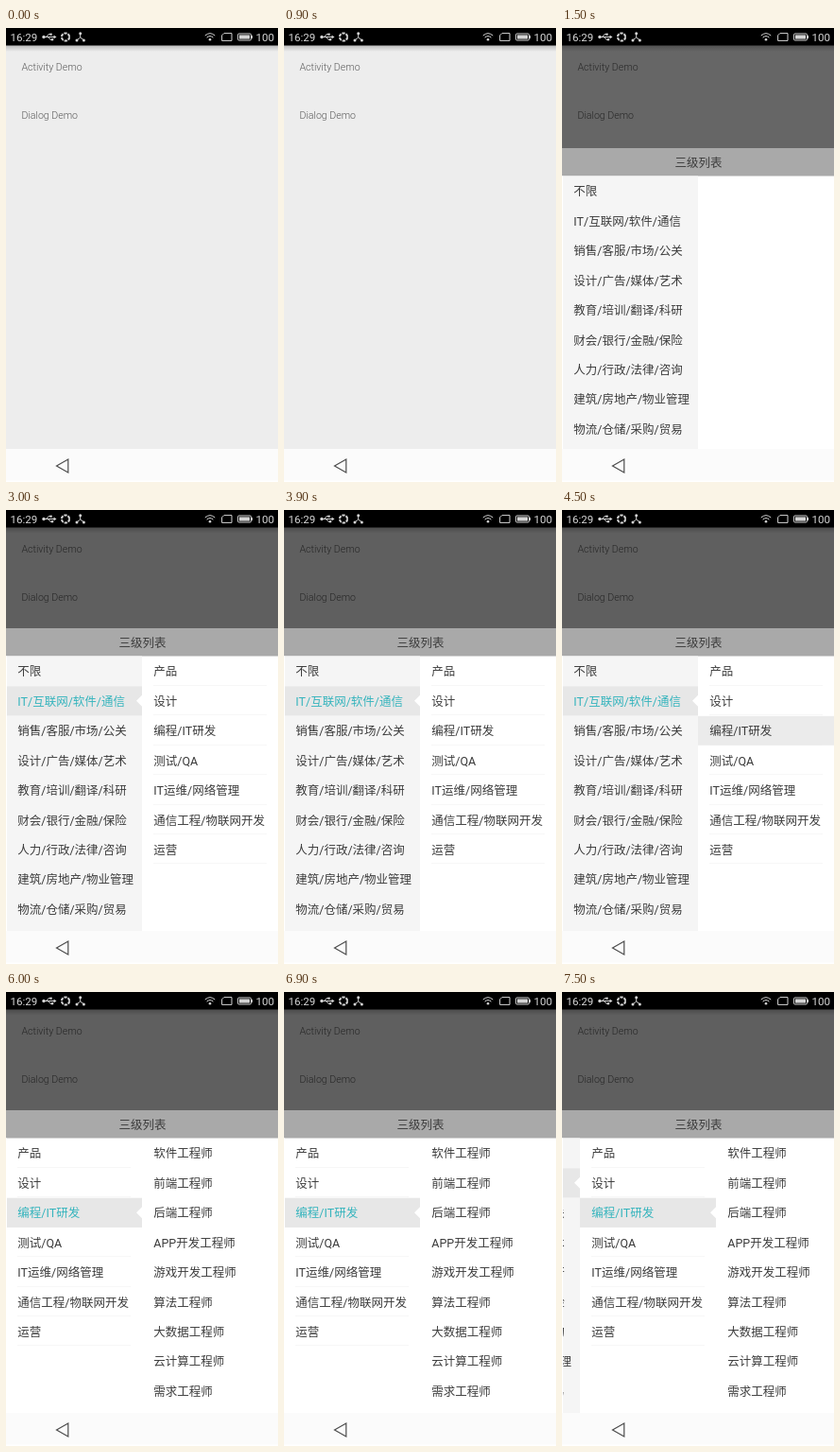
Write an HTML page that moves like this. It is 288 by 480 pixels and loops after 8000 ms.

```html
<!DOCTYPE html>
<html lang="zh-CN">
<head>
<meta charset="utf-8">
<title>三级列表</title>
<style>
  html, body { margin: 0; width: 100%; height: 100%; overflow: hidden; background: #fff; }
  svg { display: block; width: 288px; height: 480px; }
  text { font-family: Roboto, "Noto Sans CJK SC", "Noto Sans CJK", sans-serif; font-size: 12.5px; fill: #3c3c3c; }
  .label { font-size: 10.6px; font-weight: 300; fill: #5c5c5c; }
  .status { font-size: 11.6px; fill: #d8d8d8; }
  .icon { fill: none; stroke: #d4d4d4; }
  .solid { fill: #d4d4d4; }
  .divider { stroke: #f7f7f7; }

  .dim, .sheet, .strip, .shown2, .pressed, .shown3, .picked1, .picked2, .tint1, .tint2 {
    animation: 8s step-end infinite;
  }
  .dim { animation-name: dim; }
  .sheet { animation-name: sheet; }
  .strip { animation-name: strip; }
  .shown2, .picked1 { animation-name: second; }
  .pressed { animation-name: pressed; }
  .shown3, .picked2 { animation-name: third; }
  .tint1 { animation-name: tint1; }
  .tint2 { animation-name: tint2; }

  @keyframes dim { 0% { opacity: 0 } 18.75% { opacity: .57 } 37.5%, 100% { opacity: .595 } }
  @keyframes sheet {
    0% { opacity: 0; transform: translateY(2px) }
    18.75% { opacity: 1; transform: translateY(2px) }
    37.5%, 100% { opacity: 1; transform: none }
  }
  @keyframes strip {
    0% { transform: none }
    75% { transform: translateX(-144px) }
    93.75%, 100% { transform: translateX(-125px) }
  }
  @keyframes second { 0% { opacity: 0 } 37.5%, 100% { opacity: 1 } }
  @keyframes pressed { 0% { opacity: 0 } 56.25%, 100% { opacity: 1 } }
  @keyframes third { 0% { opacity: 0 } 75%, 100% { opacity: 1 } }
  @keyframes tint1 { 0% { fill: #3c3c3c } 37.5%, 100% { fill: #35b4bd } }
  @keyframes tint2 { 0% { fill: #3c3c3c } 75%, 100% { fill: #35b4bd } }
</style>
</head>
<body>
<svg viewBox="0 0 288 480">
  <defs>
    <linearGradient id="shade" x2="0" y2="1">
      <stop stop-opacity=".22"/>
      <stop offset="1" stop-opacity="0"/>
    </linearGradient>
  </defs>
  <rect width="288" height="480" fill="#fff"/>
  <rect y="18" width="288" height="428" fill="#ededed"/>
  <rect y="18" width="288" height="7" fill="url(#shade)"/>
  <text class="label" x="16.5" y="45">Activity Demo</text>
  <text class="label" x="16.5" y="96">Dialog Demo</text>
  <rect class="dim" y="18" width="288" height="428"/>

  <g class="sheet">
    <rect y="125" width="288" height="30" fill="#a9a9a9"/>
    <text x="144.5" y="144.6" text-anchor="middle">三级列表</text>
    <rect y="154.5" width="288" height="300" fill="#fff"/>
    <g class="strip" id="strip"></g>
    <rect y="154.5" width="1" height="292" fill="#fff"/>
  </g>

  <rect y="445" width="288" height="33.5" fill="#fbfbfb"/>
  <path d="M53.5 463L65.8 456V470Z" fill="none" stroke="#4c4c4c" stroke-width="1.2"/>

  <rect width="288" height="18.5" fill="#000"/>
  <text class="status" x="4.5" y="13.8">16:29</text>
  <text class="status" x="264.5" y="13.8">100</text>
  <g class="icon">
    <path d="M40 9.5H51M42.5 9.5L45 6.7H47M44.5 9.5L47 12.3H49"/>
    <circle cx="63" cy="9.5" r="4.1" stroke-width="2" stroke-dasharray="3.3 1"/>
    <path d="M78.7 5.5V10L74.8 13M78.7 10L82.6 13"/>
    <path d="M210.8 8Q216 3.4 221.2 8M212.6 10.1Q216 7 219.4 10.1"/>
    <path d="M230.8 5.6H239V13.4H228.6V7.8Z"/>
    <rect x="245.6" y="6" width="13.8" height="7" rx="1"/>
  </g>
  <g class="solid">
    <circle cx="40" cy="9.5" r="1.7"/>
    <path d="M50.5 7.6L53.5 9.5L50.5 11.4Z"/>
    <rect x="46.5" y="5.6" width="2.2" height="2.2"/>
    <circle cx="49" cy="12.3" r="1.2"/>
    <circle cx="78.7" cy="5.7" r="1.5"/>
    <circle cx="75" cy="12.9" r="1.5"/>
    <circle cx="82.4" cy="12.9" r="1.5"/>
    <circle cx="216" cy="12.2" r="1.3"/>
    <rect x="247" y="7.4" width="11" height="4.2"/>
    <rect x="259.6" y="8" width="1.4" height="3"/>
  </g>
</svg>
<script>
  const COLUMN = 144, TOP = 155, PITCH = 31.42;

  const fields = ['不限', 'IT/互联网/软件/通信', '销售/客服/市场/公关', '设计/广告/媒体/艺术',
    '教育/培训/翻译/科研', '财会/银行/金融/保险', '人力/行政/法律/咨询',
    '建筑/房地产/物业管理', '物流/仓储/采购/贸易'];
  const areas = ['产品', '设计', '编程/IT研发', '测试/QA', 'IT运维/网络管理', '通信工程/物联网开发', '运营'];
  const jobs = ['软件', '前端', '后端', 'APP开发', '游戏开发', '算法', '大数据', '云计算', '需求']
    .map(name => name + '工程师');

  const rowTop = i => TOP + i * PITCH;

  const rows = (items, picked, tint) => items.map((item, i) =>
    `<text x="12.3" y="${rowTop(i) + 20.4}" class="${i === picked ? tint : ''}">${item}</text>`).join('');

  const highlight = (i, cls, color) =>
    `<rect class="${cls}" y="${rowTop(i)}" width="${COLUMN}" height="${PITCH - 0.5}" fill="${color}"/>`;

  const notch = (i, cls) => {
    const mid = rowTop(i) + PITCH / 2 - 0.4;
    return `<path class="${cls}" d="M${COLUMN} ${mid - 6}L${COLUMN - 6} ${mid}L${COLUMN} ${mid + 6}Z" fill="#fff"/>`;
  };

  const dividers = items => items.map((_, i) =>
    `<path class="divider" d="M12 ${Math.floor(rowTop(i + 1)) - 0.5}H132"/>`).join('');

  const column = (index, cls, content) =>
    `<g transform="translate(${index * COLUMN})"><g class="${cls}">${content}</g></g>`;

  document.getElementById('strip').innerHTML =
    column(0, '', `<rect y="154.5" width="${COLUMN}" height="300" fill="#f5f5f5"/>`
      + highlight(1, 'picked1', '#e7e7e7') + notch(1, 'picked1') + rows(fields, 1, 'tint1')) +
    column(1, 'shown2', dividers(areas) + highlight(2, 'pressed', '#ebebeb')
      + highlight(2, 'picked2', '#e7e7e7') + notch(2, 'picked2') + rows(areas, 2, 'tint2')) +
    column(2, 'shown3', rows(jobs));
</script>
</body>
</html>
```
